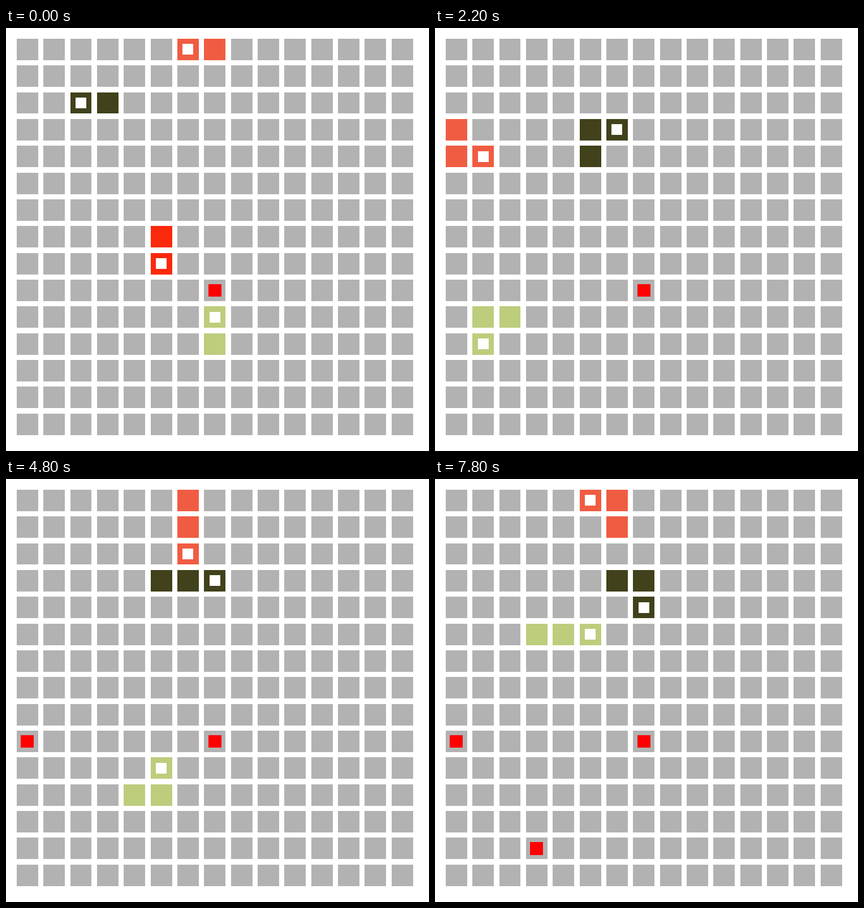
An HTML page with a canvas that plays this animation: 748 by 748 pixels, repeating every 8 s.

```html
<!DOCTYPE html>
<html lang="en">
<head>
<meta charset="utf-8">
<title>Snakes</title>
<style>
  html, body { margin: 0; width: 100%; height: 100%; overflow: hidden; background: #fff; }
  canvas { display: block; width: 748px; height: 748px; }
</style>
</head>
<body>
<canvas id="stage" width="748" height="748"></canvas>
<script>
const ctx = document.getElementById('stage').getContext('2d');
const GRID = 15, STEP_MS = 200, STEPS = 40, LENGTH = 3;
const UNIT = 748 / 79;
const MOVES = { L: [-1, 0], R: [1, 0], U: [0, -1], D: [0, 1] };

// Each snake starts coiled on one cell and takes one move per step.
const snakes = [
  { color: '#f05c42', start: [7, 0], moves: 'LLDLLLDLLD' + 'DRRURURRRU' + 'RULDDLLURR' + 'RULLDDRUUL' },
  { color: '#41411b', start: [3, 2], moves: 'LLLDRRRDRR' + 'URURDDDLLL' + 'URURRDDRDD' + 'LLLUURUURD' },
  { color: '#bccd7c', start: [7, 11], moves: 'ULULLLULDD' + 'LDRRRRULUL' + 'DDRRUULULL' + 'URRULLURRR' },
  { color: '#fb290b', start: [5, 7], moves: 'DD' }
];
const foods = [
  { cell: [7, 9], from: 0 },
  { cell: [0, 9], from: 21 },
  { cell: [3, 13], from: 28 }
];

for (const snake of snakes) {
  snake.path = [snake.start];
  for (const m of snake.moves) {
    const [x, y] = snake.path[snake.path.length - 1];
    snake.path.push([x + MOVES[m][0], y + MOVES[m][1]]);
  }
}

// Square inside a grid cell; inset and size in grid units, edges on whole pixels.
function square([col, row], inset, size, color) {
  const edge = (i, d) => Math.round((2 + 5 * i + d) * UNIT);
  const x = edge(col, inset), y = edge(row, inset);
  ctx.fillStyle = color;
  ctx.fillRect(x, y, edge(col, inset + size) - x, edge(row, inset + size) - y);
}

function drawSnake({ path, moves, color }, step) {
  if (step >= moves.length) return;
  const head = step + 1;
  for (let i = Math.max(0, head - LENGTH + 1); i <= head; i++) square(path[i], 0, 4, color);
  square(path[head], 1, 2, '#fff');
}

function draw(step) {
  ctx.fillStyle = '#fff';
  ctx.fillRect(0, 0, 748, 748);
  for (let row = 0; row < GRID; row++)
    for (let col = 0; col < GRID; col++) square([col, row], 0, 4, '#b2b2b2');
  for (const { cell, from } of foods)
    if (step >= from) square(cell, 0.795, 2.4, '#f00');
  for (const snake of snakes) drawSnake(snake, step);
}

const t0 = performance.now();
function tick() {
  draw(Math.floor((performance.now() - t0) / STEP_MS) % STEPS);
  requestAnimationFrame(tick);
}
tick();
</script>
</body>
</html>
```
